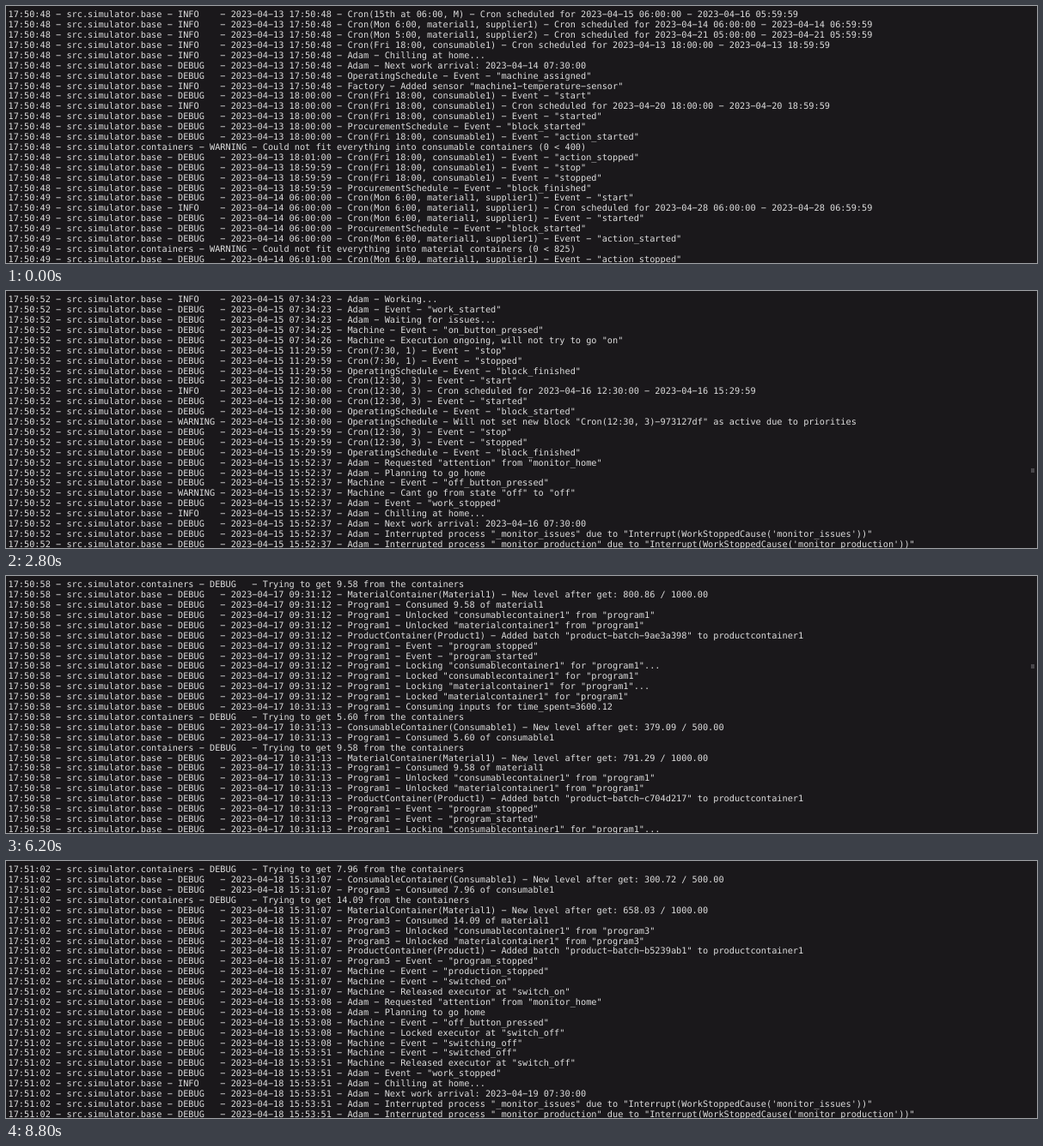
Write an HTML page with a canvas that moves like this. It is 1200x300 px and loops after 9.6 s.

```html
<!DOCTYPE html>
<html lang="en">
<head>
<meta charset="utf-8">
<title>Simulator log</title>
<style>
  html, body { margin: 0; width: 100%; height: 100%; overflow: hidden; background: #1a181b; }
  canvas { display: block; width: 1200px; height: 300px; }
</style>
</head>
<body>
<canvas id="stage" width="1200" height="300"></canvas>
<script>
const LOOP = 9600, ROWS = 25, PITCH = 11.9;
const WORKER = 'Adam';
const OPS = 'OperatingSchedule', BUY = 'ProcurementSchedule';
const MORNING = 'Cron(7:30, 1)';

const log = [];
let clock, date, time;

// --- log writing ---
function at(d, t) { date = d; time = t; }
function line(level, src, msg) {
  log.push(`${clock} - src.simulator.base - ${level.padEnd(7)} - ${date} ${time} - ${src} - ${msg}`);
}
const debug = (src, msg) => line('DEBUG', src, msg);
const info = (src, msg) => line('INFO', src, msg);
const warn = (src, msg) => line('WARNING', src, msg);
const event = (src, ...names) => names.forEach(n => debug(src, `Event - "${n}"`));
const store = (level, msg) =>
  log.push(`${clock} - src.simulator.containers - ${level.padEnd(7)} - ${msg}`);

const day = n => `2023-04-${n}`;
const two = n => String(n).padStart(2, '0');
const hms = s => [s / 3600, s / 60 % 60, s % 60].map(v => two(Math.floor(v))).join(':');
const secs = t => t.split(':').reduce((sum, v) => sum * 60 + +v, 0);

let seed = 7;
function hash() {
  seed = (seed * 1664525 + 1013904223) >>> 0;
  return seed.toString(16).padStart(8, '0');
}

// --- recurring passages ---
const scheduled = (cron, from, to) => info(cron, `Cron scheduled for ${from} - ${to}`);

function openBlock(cron, schedule, from, to) {
  event(cron, 'start');
  scheduled(cron, from, to);
  event(cron, 'started');
  event(schedule, 'block_started');
}

function closeBlock(cron, schedule) {
  event(cron, 'stop', 'stopped');
  event(schedule, 'block_finished');
}

function openMorning(n) {
  at(day(n), '07:30:00');
  openBlock(MORNING, OPS, `${day(n + 1)} 07:30:00`, `${day(n + 1)} 11:29:59`);
}

function openNoon(n, cron) {
  at(day(n), '12:30:00');
  openBlock(cron, OPS, `${day(n + 1)} 12:30:00`, `${day(n + 1)} 15:29:59`);
}

function arrive() {
  info(WORKER, 'Working...');
  event(WORKER, 'work_started');
  debug(WORKER, 'Waiting for issues...');
}

function lock(program, item) {
  debug(program, `Locking "${item}" for "${program.toLowerCase()}"...`);
  debug(program, `Locked "${item}" for "${program.toLowerCase()}"`);
}

function startWork(n, from) {
  const t0 = secs(from), later = s => at(day(n), hms(t0 + s));
  later(0);
  arrive();
  later(1);
  event('Machine', 'on_button_pressed');
  debug('Machine', 'Locked executor at "switch_on"');
  event('Machine', 'switching_on');
  later(43);
  event('Machine', 'switched_on', 'switched_on_from_off');
  debug('Machine', 'Released executor at "switch_on"');
  debug(OPS, `Running block "${MORNING}-973127df" at machine start`);
  event(MORNING, 'action_started');
  event('Machine', 'switching_program_automatically');
  debug('Machine', 'Skipping executor waiting at switching program');
  event('Machine', 'switching_program');
  later(115);
  event('Machine', 'switched_program');
  later(116);
  warn('Machine', 'Skipping executor waiting at switching production');
  event('Machine', 'switching_production', 'switched_production', 'production_started');
  event('Program1', 'program_started');
  debug('Program1', 'Locking "consumablecontainer1" for "program1"...');
  event('Machine', 'switched_program_automatically');
  debug('Program1', 'Locked "consumablecontainer1" for "program1"');
  lock('Program1', 'materialcontainer1');
}

function take(program, kind, amount, level, size) {
  const got = amount.toFixed(2);
  store('DEBUG', `Trying to get ${got} from the containers`);
  debug(`${kind}Container(${kind}1)`, `New level after get: ${level.toFixed(2)} / ${size}.00`);
  debug(program, `Consumed ${got} of ${kind.toLowerCase()}1`);
}

function finishBatch(program, spent, use, id) {
  debug(program, `Consuming inputs for time_spent=${spent}`);
  take(program, 'Consumable', ...use[0], 500);
  take(program, 'Material', ...use[1], 1000);
  for (const item of ['consumable', 'material'])
    debug(program, `Unlocked "${item}container1" from "${program.toLowerCase()}"`);
  debug('ProductContainer(Product1)', `Added batch "product-batch-${id}" to productcontainer1`);
  event(program, 'program_stopped');
}

function nextBatch(program) {
  event(program, 'program_started');
  lock(program, 'consumablecontainer1');
  lock(program, 'materialcontainer1');
}

function leave(n) {
  event(WORKER, 'work_stopped');
  info(WORKER, 'Chilling at home...');
  debug(WORKER, `Next work arrival: ${day(n + 1)} 07:30:00`);
  for (const job of ['monitor_issues', 'monitor_production'])
    debug(WORKER, `Interrupted process "_${job}" due to "Interrupt(WorkStoppedCause('${job}'))"`);
}

function planHome() {
  debug(WORKER, 'Requested "attention" from "monitor_home"');
  debug(WORKER, 'Planning to go home');
  event('Machine', 'off_button_pressed');
}

const ongoing = () => debug('Machine', 'Execution ongoing, will not try to go "on"');

function goHome(n, [plan, off, done]) {
  at(day(n), plan);
  planHome();
  at(day(n), off);
  debug('Machine', 'Locked executor at "switch_off"');
  event('Machine', 'switching_off');
  at(day(n), done);
  event('Machine', 'switched_off');
  debug('Machine', 'Released executor at "switch_off"');
}

// Eight hourly batches; the last `late` ones use the afternoon program.
function produce(o) {
  const noon = `Cron(12:30, ${o.program})`, total = 8;
  const usage = ({ from, to, get }, k) => {
    const early = (from - to - get * o.late) / (total - o.late);
    return k > total - o.late ? [get, to + get * (total - k)] : [early, from - early * k];
  };
  for (let k = 1; k <= total; k++) {
    if (k > total / 2) clock = o.clock;
    if (k === 5) {
      at(day(o.n), '11:29:59');
      closeBlock(MORNING, OPS);
      openNoon(o.n, noon);
      event(noon, 'action_started');
      event('Machine', 'switching_program_automatically');
      debug('Machine', 'Skipping executor waiting at switching program');
      event('Machine', 'switching_program', 'switched_program');
    }
    if (k === total) {
      marks[`end${o.n}`] = log.length;
      at(day(o.n), '15:29:59');
      closeBlock(noon, OPS);
      debug(noon, 'Switching to on');
      event(noon, 'action_stopped');
      ongoing();
    }
    const program = 'Program' + (k > total - o.late ? o.program : 1);
    at(day(o.n), hms(secs(o.base) + 3601 * k));
    finishBatch(program, o.spent, [usage(o.cons, k), usage(o.mat, k)], o.ids[k] || hash());
    if (k < total) nextBatch(program);
  }
  event('Machine', 'production_stopped');
  if (o.home) {
    if (o.settle) at(day(o.n), o.settle);
    event('Machine', 'switched_on');
    debug('Machine', 'Released executor at "switch_on"');
    goHome(o.n, o.home);
  } else {
    event('Machine', 'switched_off');
    debug('Machine', 'Released executor at "switch_off"');
  }
  leave(o.n);
  marks[`home${o.n}`] = log.length - ROWS;
}

// --- the story ---
const marks = {};

function setup() {
  const maint = 'Cron(15th at 06:00, M)', fri = 'Cron(Fri 18:00, consumable1)';
  const mon = s => `Cron(Mon ${s === 1 ? 6 : 5}:00, material1, supplier${s})`;
  const hour = (cron, n, h) => [cron, `${day(n)} ${h}:00:00`, `${day(n)} ${h}:59:59`];

  clock = '17:50:48';
  at(day(13), clock);
  scheduled(maint, `${day(15)} 06:00:00`, `${day(16)} 05:59:59`);
  scheduled(...hour(mon(1), 14, '06'));
  scheduled(...hour(mon(2), 21, '05'));
  scheduled(...hour(fri, 13, '18'));
  info(WORKER, 'Chilling at home...');
  debug(WORKER, `Next work arrival: ${day(14)} 07:30:00`);
  event(OPS, 'machine_assigned');
  info('Factory', 'Added sensor "machine1-temperature-sensor"');

  const order = (cron, n, next, h, kind, amount) => {
    at(day(n), `${h}:00:00`);
    const [, from, to] = hour(cron, next, h);
    openBlock(cron, BUY, from, to);
    event(cron, 'action_started');
    store('WARNING', `Could not fit everything into ${kind} containers (0 < ${amount})`);
    at(day(n), `${h}:01:00`);
    event(cron, 'action_stopped');
    at(day(n), `${h}:59:59`);
    closeBlock(cron, BUY);
  };
  order(fri, 13, 20, '18', 'consumable', 400);
  clock = '17:50:49';
  order(mon(1), 14, 28, '06', 'material', 825);
  return maint;
}

function maintenanceDay(maint) {
  const noon = 'Cron(12:30, 3)';
  const blocked = cron =>
    warn(OPS, `Will not set new block "${cron}-973127df" as active due to priorities`);
  marks.service = log.length - 1;
  clock = '17:50:52';
  at(day(15), '06:00:00');
  openBlock(maint, OPS, '2023-05-15 06:00:00', '2023-05-16 05:59:59');
  event(maint, 'action_started');
  debug(maint, 'Maintenance duration: 24.0 hours');
  at(day(15), '06:04:59');
  event('Maintenance', 'added_issue', 'fixing_issue');
  at(day(15), '06:05:00');
  event('Machine', 'off_button_pressed');
  warn('Machine', 'Cant go from state "off" to "off"');
  event('Machine', 'switched_off');
  for (const s of ['Locked UI', 'Locked executor', 'Waiting 88200 seconds']) debug('Maintenance', s);
  openMorning(15);
  blocked(MORNING);
  at(day(15), '07:34:23');
  arrive();
  at(day(15), '07:34:25');
  event('Machine', 'on_button_pressed');
  at(day(15), '07:34:26');
  ongoing();

  at(day(15), '11:29:59');
  closeBlock(MORNING, OPS);
  openNoon(15, noon);
  blocked(noon);
  at(day(15), '15:29:59');
  closeBlock(noon, OPS);
  at(day(15), '15:52:37');
  planHome();
  warn('Machine', 'Cant go from state "off" to "off"');
  leave(15);
  marks.home15 = log.length - ROWS;

  clock = '17:50:55';
  at(day(16), '06:35:00');
  for (const s of ['Released executor', 'Released UI']) debug('Maintenance', s);
  event('Maintenance', 'fixed_issue');
}

function build() {
  const maint = setup();
  openMorning(14);
  startWork(14, '07:34:10');
  produce({
    n: 14, clock: '17:50:50', program: 3, late: 4, base: '07:31:20', spent: '3600.35',
    cons: { from: 500, to: 447.90, get: 8.02 }, mat: { from: 1000, to: 909.88, get: 13.98 },
    ids: { 6: 'b21bd21a', 7: 'ffc7777a' }, home: ['15:47:15', '15:47:16', '15:47:58']
  });
  maintenanceDay(maint);

  openMorning(16);
  marks.work16 = log.length;
  startWork(16, '07:42:03');
  produce({
    n: 16, clock: '17:50:56', program: 3, late: 3, base: '07:31:08', spent: '3600.03',
    cons: { from: 447.90, to: 395.88, get: 7.98 }, mat: { from: 909.88, to: 820.02, get: 13.76 },
    ids: { 8: '4c1d5ad3' }
  });

  clock = '17:50:58';
  openMorning(17);
  startWork(17, '07:36:41');
  produce({
    n: 17, clock: '17:50:59', program: 2, late: 3, base: '07:31:10', spent: '3600.12',
    cons: { from: 395.88, to: 352.78, get: 5.04 }, mat: { from: 820.02, to: 748.16, get: 7.99 },
    ids: { 8: 'dd0690c8' }, settle: '15:31:19', home: ['16:00:49', '16:00:50', '16:01:29']
  });

  clock = '17:51:01';
  openMorning(18);
  startWork(18, '07:39:26');
  produce({
    n: 18, clock: '17:51:02', program: 3, late: 3, base: '07:30:59', spent: '3600.21',
    cons: { from: 352.78, to: 300.72, get: 7.96 }, mat: { from: 748.16, to: 658.03, get: 14.09 },
    ids: { 8: 'b5239ab1' }, home: ['15:53:08', '15:53:08', '15:53:51']
  });
}
build();

// --- scrolling: each page is [time, first line, scrollbar centre] ---
const pages = [[0, 0, 315]];
function scroll(times, row, bar) {
  const [, row0, bar0] = pages[pages.length - 1];
  times.forEach((t, i) => {
    const f = (i + 1) / times.length;
    pages.push([t, Math.round(row0 + (row - row0) * f), bar0 + (bar - bar0) * f]);
  });
}
const burst = t => [0, 1, 2, 3, 4].map(i => t + 200 * i);

scroll([200, 400, 600, 800], marks.end14 - ROWS, 241);
scroll([1000], marks.home14, 232);
scroll([2000, 2200], marks.service, 222);
scroll([2600, 2800], marks.home15, 209);
scroll([4000], marks.work16, 200);
scroll([4200, 4400, 4600, 4800], marks.home16, 134);
scroll(burst(6000), marks.home17, 63);
scroll(burst(8000), marks.home18, -8);

// --- drawing ---
const ctx = document.getElementById('stage').getContext('2d');

function draw([, first, bar]) {
  ctx.fillStyle = '#1a181b';
  ctx.fillRect(0, 0, 1200, 300);
  ctx.fillStyle = '#48464a';
  ctx.fillRect(1193, Math.round(bar - 2.5), 4, 5);
  ctx.font = '10.25px "DejaVu Sans Mono", monospace';
  ctx.textRendering = 'geometricPrecision';
  ctx.fillStyle = '#dedede';
  for (let i = 0; i < ROWS; i++)
    ctx.fillText(log[first + i].replace(/-/g, '\u2212'), 2.5, 13.2 + i * PITCH);
}

let shown;
function tick() {
  const t = performance.now() % LOOP;
  const page = pages.findLast(p => p[0] <= t);
  if (page !== shown) draw(shown = page);
  requestAnimationFrame(tick);
}
tick();
</script>
</body>
</html>
```
